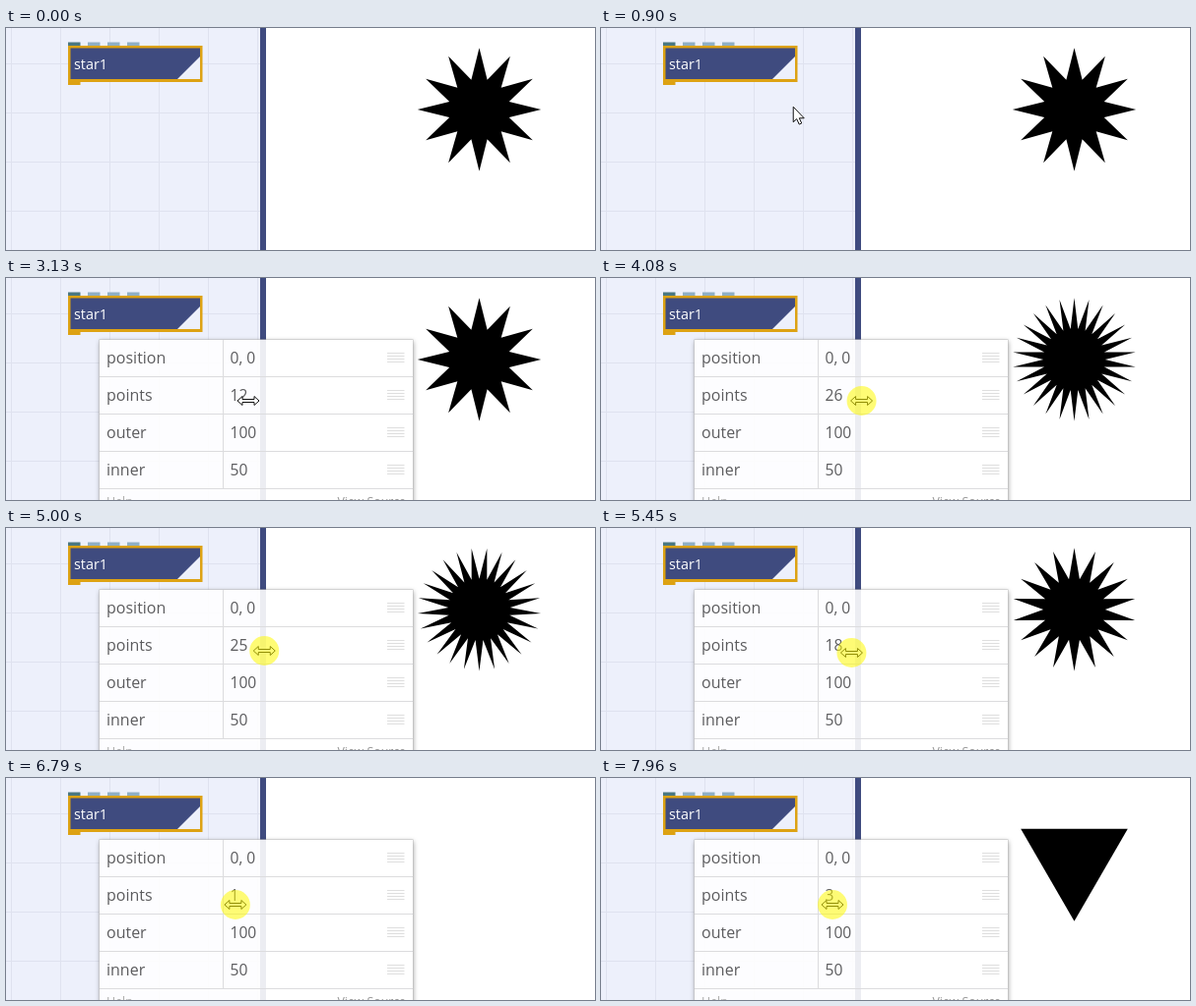
Recreate the animation shown at these times as an HTML page with a canvas. Size 598 px wide and 226 px high, loop 8 s.

```html
<!DOCTYPE html>
<html lang="en">
<head>
<meta charset="utf-8">
<title>Star node</title>
<style>
  html, body { margin: 0; width: 100%; height: 100%; overflow: hidden; background: #fff; }
  canvas { display: block; }
</style>
</head>
<body>
<canvas id="stage" width="598" height="226"></canvas>
<script>
const ctx = document.getElementById('stage').getContext('2d');
const LOOP = 8000;
const FONT = '"Open Sans", "Noto Sans", sans-serif';
const NAVY = '#3f4b7f', PALE = '#edf0fb', GOLD = '#dda213';

// Pointer moves: start, end, steps, x, y
const moves = [
  [360, 1130, 11, 152, 48],
  [2360, 3130, 11, 246, 125]
];
// Drags of the value: start, end, steps, value, pointer y
const drags = [
  [3360, 3600, 4, 16, 125],
  [3760, 4230, 7, 31.2, 125],
  [4620, 4840, 4, 26.5, 125],
  [5000, 5150, 3, 22, 125],
  [5310, 5540, 4, 15.5, 129],
  [5700, 5700, 1, 14.8, 129],
  [5850, 5850, 1, 14, 129],
  [6010, 6630, 9, 2.5, 129],
  [6790, 6790, 1, 1.5, 129],
  [7800, 7960, 3, 3.2, 129]
];

const linear = p => p;
const smooth = p => p * p * (3 - 2 * p);

// Follows the segments in discrete steps, the first one taken at the start time.
function follow(segments, from, t, ease) {
  let [a, b] = from;
  for (const [start, end, steps, toA, toB] of segments) {
    if (t < start) break;
    const k = t >= end ? steps : Math.floor((t - start) / (end - start) * (steps - 1) + 1e-6) + 1;
    const p = ease(k / steps);
    a += (toA - a) * p;
    b += (toB - b) * p;
  }
  return [a, b];
}

function rect(color, x, y, w, h) {
  ctx.fillStyle = color;
  ctx.fillRect(x, y, w, h);
}

function label(text, x, y, size, color, align = 'left') {
  ctx.font = `${size}px ${FONT}`;
  ctx.textAlign = align;
  ctx.fillStyle = color;
  ctx.fillText(text, x, y);
}

function polygon(points, fill, stroke) {
  ctx.beginPath();
  points.forEach(([x, y]) => ctx.lineTo(x, y));
  ctx.closePath();
  ctx.fillStyle = fill;
  ctx.fill();
  if (stroke) {
    ctx.strokeStyle = stroke;
    ctx.lineWidth = 1;
    ctx.stroke();
  }
}

function drawBackground() {
  rect('#fff', 0, 0, 598, 226);
  rect(PALE, 0, 0, 258, 226);
  for (let x = 5; x < 258; x += 50) rect('#dfe2ef', x, 0, 1, 226);
  for (let y = 36; y < 226; y += 50) rect('#dfe2ef', 0, y, 258, 1);
  rect(NAVY, 258, 0, 6, 226);
}

function drawNode(hover) {
  for (let i = 0; i < 4; i++) rect(i ? '#8fafc4' : '#4b7880', 63 + i * 20, 14.5, 12.5, 4);
  rect(GOLD, 63, 54, 12.5, 4);
  rect(GOLD, 63, 18, 136.5, 37);
  rect(hover ? '#273d74' : NAVY, 65.5, 20.5, 131.5, 31.5);
  polygon([[174, 52], [197, 29], [197, 52]], PALE);
  label('star1', 69, 42, 14.4, '#fff');
}

function drawStar(count) {
  const points = [];
  for (let i = 0; i < count * 2; i++) {
    const angle = Math.PI * i / count, r = i % 2 ? 31.35 : 62.7;
    points.push([480.5 + r * Math.sin(angle), 83 + r * Math.cos(angle)]);
  }
  polygon(points, '#000');
}

function drawPanel(count, alpha) {
  ctx.save();
  ctx.globalAlpha = alpha;

  // The shadow stays outside the translucent panel.
  ctx.save();
  ctx.beginPath();
  ctx.rect(0, 0, 598, 226);
  ctx.rect(95, 63, 318, 180);
  ctx.clip('evenodd');
  ctx.shadowColor = 'rgba(0,0,0,.4)';
  ctx.shadowBlur = 5;
  ctx.shadowOffsetY = 1;
  rect('#bbb', 94.5, 62.5, 319, 181);
  ctx.restore();

  rect('rgba(255,255,255,.9)', 95, 63, 318, 163);
  const rows = [['position', '0, 0'], ['points', count], ['outer', 100], ['inner', 50]];
  rows.forEach(([name, value], i) => {
    const y = 63 + i * 38;
    label(name, 102, y + 24, 16, '#5c5c5e');
    label(String(value), 227.5, y + 24, 15.6, '#5c5c5e');
    rect('#dcdcde', 95, y + 37, 318, 1);
    for (let j = 0; j < 4; j++) rect('#dedede', 387, y + 13 + j * 3, 17.5, 1);
  });
  rect('#dcdcde', 220, 63, 1, 152);
  label('Help', 102, 231.5, 12.4, '#aaa');
  label('View Source', 406, 231.5, 12.4, '#999', 'right');
  ctx.restore();
}

function drawPointer(x, y, resize) {
  const shape = resize
    ? [[-11, 0], [-6, -4.5], [-6, -1.5], [6, -1.5], [6, -4.5], [11, 0],
       [6, 4.5], [6, 1.5], [-6, 1.5], [-6, 4.5]]
    : [[0.5, 0.5], [0.5, 16], [4, 12.8], [6.5, 18.3], [9, 17.2], [6.6, 12], [11.5, 12]];
  polygon(shape.map(([dx, dy]) => [x + dx, y + dy]), '#fff', '#111');
}

function drawPress(x, y) {
  ctx.beginPath();
  ctx.arc(x, y, 15, 0, Math.PI * 2);
  ctx.fillStyle = 'rgba(255,250,0,.54)';
  ctx.fill();
}

function draw(t) {
  let [x, y] = follow(moves, [386, 222], t, smooth);
  const [value, dragY] = follow(drags, [12, 125], t, linear);
  if (t >= 3130) {
    x = 246 + (value - 12) * 1.25;
    y = dragY;
  }
  const count = Math.floor(value + 1e-6);
  const shown = t >= 360;
  const hover = shown && x > 63 && x < 199 && y > 18 && y < 55;
  const pressed = (t >= 1200 && t < 1970) || t >= 3210;

  drawBackground();
  drawNode(hover);
  drawStar(count);
  if (t >= 1970) drawPanel(count, t < 2050 ? 0.6 : 1);
  if (shown) drawPointer(x, y, t > 2360 && x > 221 && y > 100);
  if (pressed) drawPress(x, y);
}

const begin = performance.now();
function tick() {
  draw((performance.now() - begin) % LOOP);
  requestAnimationFrame(tick);
}
tick();
</script>
</body>
</html>
```
